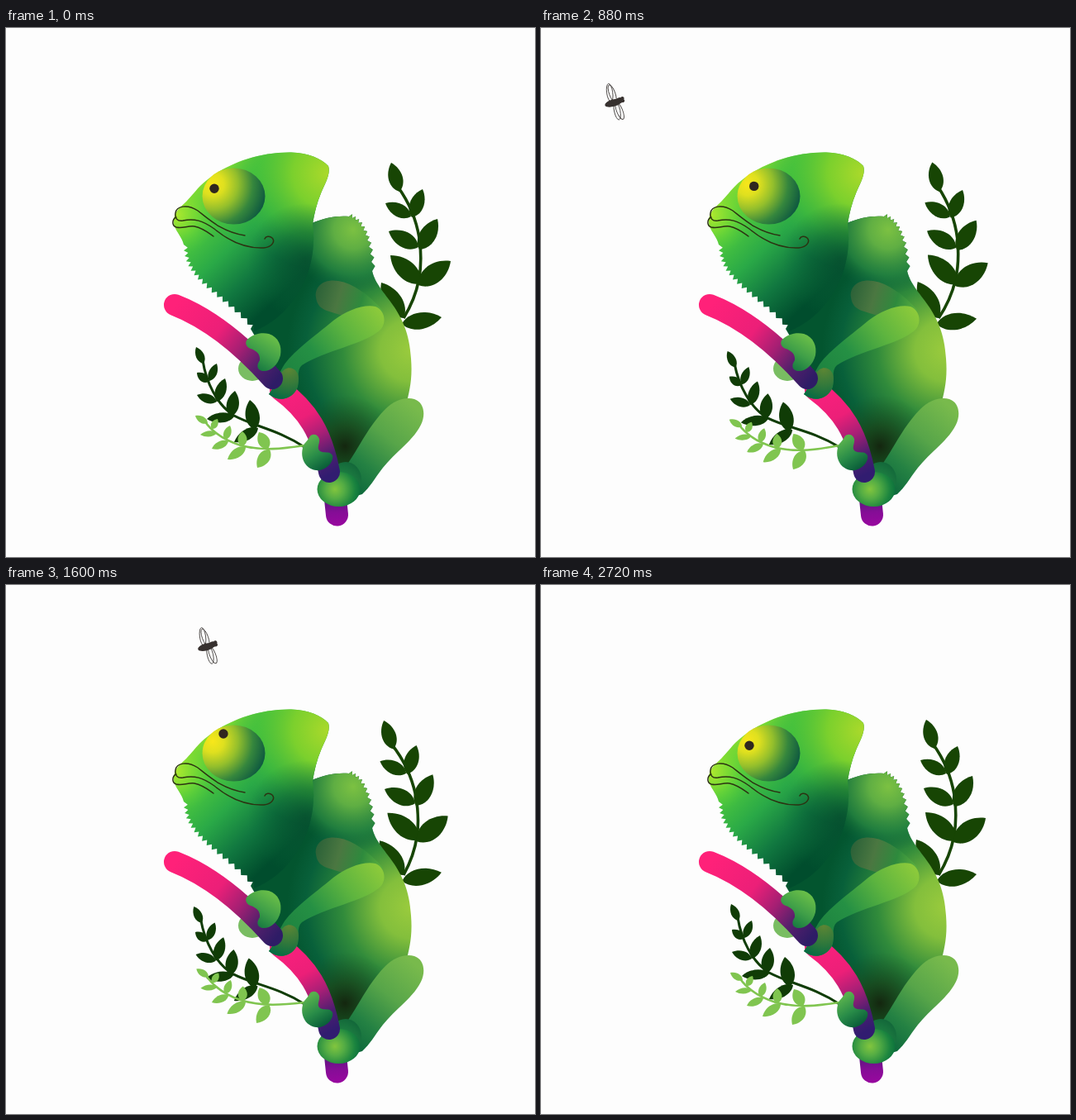
An HTML page that plays this animation: 640 px wide and 640 px high, repeating every 2800 ms.

```html
<!DOCTYPE html>
<html lang="en">
<head>
<meta charset="utf-8">
<title>Chameleon and fly</title>
<style>
html, body { margin: 0; width: 100%; height: 100%; overflow: hidden; background: #fdfdfd; }
svg { display: block; width: 100vw; height: 100vh; }
</style>
</head>
<body>
<svg viewBox="0 0 640 640">
  <defs id="defs"></defs>

  <g id="right" fill="#174504" stroke="#174504"></g>
  <g id="dark" fill="#103c06" stroke="#103c06"></g>
  <g id="light" fill="#80c550" stroke="#80c550"></g>

  <!-- torso -->
  <g id="torso"></g>

  <!-- upper arm -->
  <path fill="url(#upper)" d="M375 326C373 312 385 303 402 306C420 309 438 322 456 342L436 362C420 350 400 346 388 342C380 339 376 334 375 326Z"/>

  <!-- leg -->
  <path fill="url(#leg)" d="M410 532C426 510 438 482 459 461C470 450 484 446 494 449C506 453 508 468 502 480C492 500 472 512 456 532C446 545 440 556 431 564L404 572Z"/>
  <ellipse cx="411" cy="546" rx="19" ry="21" fill="url(#ankle)"/>

  <!-- head -->
  <g id="head"></g>
  <ellipse cx="275.500" cy="203.500" rx="38" ry="34" fill="url(#eye)"/>
  <circle id="pupil" r="5.700" fill="#30271f"/>
  <g fill="none" stroke="#2c3312" stroke-width="1.500" stroke-linecap="round">
    <path d="M289 251C262 247 246 232 232 221C220 213 206 215 205 224C204 231 208 234 214 233C228 230 238 233 252 243C270 258 290 267 312 266C322 265 326 258 322 254C319 251 314 252 313 255"/>
    <path d="M206 229C201 231 200 239 206 241C213 243 220 239 228 240C238 242 244 247 251 252"/>
  </g>

  <!-- branch with hands and feet -->
  <ellipse cx="298" cy="412" rx="17" ry="15" fill="#79bd62"/>
  <g fill="none" stroke-width="26" stroke-linecap="round">
    <path stroke="url(#tip)" stroke-width="27" d="M398 565L400.500 589"/>
  </g>
  <ellipse cx="402.500" cy="558" rx="26" ry="21" fill="url(#foot)"/>
  <path fill="none" stroke="url(#low)" stroke-width="26" stroke-linecap="round" d="M332 438C365 462 382 490 391 537"/>
  <path fill="url(#fore)" d="M318 443C324 436 329 420 335 410C346 392 372 374 396 354C412 342 432 334 447 337C459 342 461 358 452 366C432 383 386 390 358 408C351 414 355 426 353 434C349 448 330 454 318 443Z"/>
  <path fill="url(#palm)" d="M318 443C324 436 328 420 337 413C345 408 354 414 354 424C354 446 334 456 318 443Z"/>
  <path fill="none" stroke="url(#top)" stroke-width="26" stroke-linecap="round" d="M204 335C248 352 286 384 322 424"/>
  <path fill="url(#finger)" d="M291 378C298 370 309 368 318 370C330 374 334 385 332 396C329 408 320 416 310 415C302 413 304 406 307 402C308 394 302 390 296 388C291 386 289 382 291 378Z"/>
  <path fill="url(#toe)" d="M359 508C360 502 365 500 367 495C370 490 377 491 379 497C380 503 375 508 380 512C385 515 391 511 395 517C397 524 389 533 380 535C366 537 355 524 359 508Z"/>

  <!-- fly -->
  <g id="fly">
    <g fill="none" stroke="#4a4644" stroke-width=".9">
      <ellipse cx="-6" cy="-11" rx="3.600" ry="11" transform="rotate(-8 -6 -11)"/>
      <ellipse cx="-3" cy="-10" rx="3.600" ry="11" transform="rotate(-20 -3 -10)"/>
      <ellipse cx="3" cy="11" rx="3.600" ry="11" transform="rotate(-12 3 11)"/>
      <ellipse cx="6" cy="11" rx="3.600" ry="11" transform="rotate(-22 6 11)"/>
    </g>
    <g fill="#37312f" transform="rotate(-15)">
      <ellipse cx="-2" cy="1" rx="10.500" ry="4.300"/>
      <ellipse cx="6" cy="0" rx="4" ry="3.500"/>
      <circle cx="10" cy="-1.500" r="2.200"/>
      <circle cx="10" cy="1.500" r="2"/>
    </g>
  </g>
</svg>

<script>
const $ = id => document.getElementById(id);

// ---- gradients: stops are "offset colour opacity" separated by commas
const stopsOf = list => list.split(',').map(s => {
  const [o, c, a = 1] = s.trim().split(' ');
  return `<stop offset="${o}" stop-color="${c}" stop-opacity="${a}"/>`;
}).join('');
const linear = (id, x1, y1, x2, y2, list) =>
  `<linearGradient id="${id}" gradientUnits="userSpaceOnUse" x1="${x1}" y1="${y1}" x2="${x2}" y2="${y2}">${stopsOf(list)}</linearGradient>`;
const radial = (id, cx, cy, r, list) =>
  `<radialGradient id="${id}" gradientUnits="userSpaceOnUse" cx="${cx}" cy="${cy}" r="${r}">${stopsOf(list)}</radialGradient>`;

$('defs').innerHTML = [
  radial('belly', 490, 390, 150, '0 #9acb3d, .25 #83bf3c, .55 #318b3b, .85 #08603a, 1 #03552f'),
  radial('hump', 420, 244, 78, '0 #7cc142, .3 #5fae43, .7 #268540 .8, 1 #0b6337 0'),
  radial('groin', 410, 506, 62, '0 #14260f, .4 #1c4518 .75, 1 #1c5a20 0'),
  linear('skin', 222, 196, 338, 318, '0 #8fe02f, .22 #4fca3d, .5 #2aa947, .75 #117840, 1 #004d2d'),
  radial('crest', 388, 176, 118, '0 #a9d92b, .35 #7bd02d, .7 #45bf3b .7, 1 #2aa947 0'),
  radial('snout', 206, 226, 50, '0 #aee92e, .5 #7cdc33 .6, 1 #4fca3d 0'),
  radial('nape', 362, 282, 70, '0 #064f2f .85, .5 #075a33 .5, 1 #0a6b38 0'),
  radial('eye', 250, 189, 68, '0 #f8e71a, .2 #dfe01f, .45 #94bf2c, .72 #35863d, 1 #0a5440'),
  linear('upper', 376, 318, 452, 340, '0 #2c6238, .35 #4b7741, .7 #2e8a3d, 1 #57ab3e'),
  linear('fore', 452, 342, 326, 436, '0 #8cca3b, .3 #5db43f, .6 #259044, .85 #1e8440, 1 #2d7c39'),
  radial('palm', 342, 412, 38, '0 #5f8634, .5 #38793a .9, 1 #066b43'),
  linear('leg', 494, 458, 414, 552, '0 #78ba4c, .4 #57a549, .75 #248143, 1 #0f6a3c'),
  radial('ankle', 404, 556, 32, '0 #2c8e42, .6 #1c7a40, 1 #13683a'),
  radial('foot', 398, 558, 32, '0 #82c53e, .35 #55ad44, .75 #1c853f, 1 #0b6f3c'),
  linear('finger', 326, 376, 302, 414, '0 #68bd48, .5 #3f9f48, 1 #137540'),
  linear('toe', 364, 500, 386, 534, '0 #57b04d, .5 #288b48, 1 #075a38'),
  linear('top', 205, 335, 326, 428, '0 #ff2179, .4 #ec1f78, .62 #a51f73, .8 #58206c, 1 #2e1c66'),
  linear('low', 340, 444, 393, 540, '0 #f7207c, .3 #ec1f78, .55 #a81f76, .8 #4d1e70, 1 #311c70'),
  linear('tip', 398, 570, 400, 602, '0 #5a167e, .5 #850d96, 1 #98089f')
].join('');

// ---- saw-toothed edge along a cubic curve
function teeth(p, n, amp) {
  let d = '';
  for (let i = 0; i <= 2 * n; i++) {
    const t = i / (2 * n), u = 1 - t;
    const at = k => u*u*u*p[k] + 3*u*u*t*p[k+2] + 3*u*t*t*p[k+4] + t*t*t*p[k+6];
    const slope = k => u*u*(p[k+2]-p[k]) + 2*u*t*(p[k+4]-p[k+2]) + t*t*(p[k+6]-p[k+4]);
    const dx = slope(0), dy = slope(1), len = Math.hypot(dx, dy);
    const out = (i % 2 ? amp : 0) / len;
    d += `L${(at(0) + dy * out).toFixed(1)} ${(at(1) - dx * out).toFixed(1)}`;
  }
  return d;
}
const layers = (d, ids) => ids.map(id => `<path d="${d}" fill="url(#${id})"/>`).join('');

const torso = 'M366 238C385 229 400 227 415 228' +
  teeth([415, 228, 430, 234, 440, 252, 443, 294], 11, 4) +
  'C450 324 487 338 490 400C492 425 488 440 484 456L440 540L404 548C392 500 370 464 340 440L296 364Z';
const back = teeth([300, 367, 255, 318, 213, 305, 215, 262], 17, -5);
const head = 'M215 262C213 252 203 244 203 234C203 226 208 219 214 214C226 203 232 192 243 184' +
  'C262 168 300 150 345 150.500C365 151 382 158 390 167C393 177 386 188 381 200C376 212 373 224 371 237' +
  'C379 296 345 350 300 367' + back + 'Z';
$('torso').innerHTML = layers(torso, ['belly', 'hump', 'groin']);
$('head').innerHTML = layers(head, ['skin', 'crest', 'snout', 'nape']);

// ---- plants
function leaf([x1, y1, x2, y2, w]) {
  const dx = x2 - x1, dy = y2 - y1, len = Math.hypot(dx, dy);
  const nx = -dy / len * w * .67, ny = dx / len * w * .67;
  const c = (f, s) => `${(x1 + dx * f + nx * s).toFixed(1)} ${(y1 + dy * f + ny * s).toFixed(1)}`;
  return `<path stroke="none" d="M${x1} ${y1}C${c(.2, 1)} ${c(.68, 1)} ${x2} ${y2}C${c(.68, -1)} ${c(.2, -1)} ${x1} ${y1}Z"/>`;
}
const plant = (id, stem, width, leaves) => {
  $(id).innerHTML = `<path fill="none" stroke-width="${width}" d="${stem}"/>` + leaves.map(leaf).join('');
};
plant('right', 'M481 351C500 320 505 290 500 254C496 230 487 210 474 192', 3.6, [
  [476, 198, 466, 163, 17],
  [490, 228, 459, 212, 16], [491, 229, 504, 195, 17],
  [499, 265, 463, 246, 19], [500, 268, 522, 231, 20],
  [502, 309, 465, 275, 22], [499, 311, 538, 282, 23],
  [481, 351, 454, 308, 22], [479, 358, 527, 350, 20]
]);
plant('dark', 'M361 507C330 486 300 482 276 469C255 456 242 428 238 402', 3, [
  [239, 406, 230, 386, 10],
  [245, 428, 231, 417, 10], [246, 427, 255, 406, 10],
  [255, 452, 231, 444, 11], [255, 452, 265, 424, 13],
  [276, 470, 243, 473, 12], [272, 470, 277, 439, 15],
  [305, 484, 276, 501, 13], [301, 486, 295, 450, 17]
]);
plant('light', 'M361 505C335 509 310 512 284 505C262 498 248 487 240 475', 2.6, [
  [244, 478, 229, 469, 8],
  [249, 485, 256, 473, 8], [255, 490, 235, 492, 7],
  [265, 498, 271, 481, 9], [269, 500, 249, 509, 9],
  [286, 506, 286, 488, 11], [290, 507, 268, 522, 11],
  [317, 509, 306, 489, 14], [319, 510, 304, 532, 14]
]);

// ---- motion: smooth monotone curve through [time, value] pairs
function track(...keys) {
  const slope = i => (keys[i + 1][1] - keys[i][1]) / (keys[i + 1][0] - keys[i][0]);
  const m = keys.map((_, i) => {
    if (!i || i === keys.length - 1) return 0;
    const a = slope(i - 1), b = slope(i);
    return a * b > 0 ? 2 * a * b / (a + b) : 0;
  });
  return t => {
    if (t <= keys[0][0]) return keys[0][1];
    for (let i = 0; i < keys.length - 1; i++) {
      const [t0, a] = keys[i], [t1, b] = keys[i + 1];
      if (t > t1) continue;
      const h = t1 - t0, s = (t - t0) / h, s2 = s * s, s3 = s2 * s;
      return a * (2*s3 - 3*s2 + 1) + b * (3*s2 - 2*s3) + h * (m[i] * (s3 - 2*s2 + s) + m[i+1] * (s3 - s2));
    }
    return keys[keys.length - 1][1];
  };
}
const flyX = track([400, -70], [560, 11], [640, 45], [1120, 128], [1600, 244], [1920, 295], [2240, 338], [2320, 350]);
const flyY = track([400, 165], [560, 128], [640, 109], [1120, 79], [1600, 73.5], [1920, 53], [2240, 2], [2320, -40]);
const pupilX = track([400, 252], [640, 254.5], [1120, 260.5], [1600, 263], [2320, 263], [2720, 252]);
const pupilY = track([400, 194.3], [640, 193.5], [1120, 188.3], [1600, 180], [2320, 180], [2720, 194.3]);
const sways = [
  ['right', 481, 352, track([0, 0], [640, 1.6], [880, 2.2], [1120, 1.6], [1600, -2.7], [1920, -4], [2320, -2.1], [2720, 0])],
  ['dark', 361, 507, track([0, 0], [640, -1.9], [1120, -2.2], [1600, -1.3], [1920, -2.3], [2320, -2.6], [2720, 0])],
  ['light', 360, 505, track([0, 0], [640, -2], [1120, -2.1], [1600, 2], [1920, 2.2], [2320, 0], [2720, 0])]
];

const LOOP = 2800, STEP = 80;
function draw(ms) {
  const t = Math.floor(ms % LOOP / STEP) * STEP;
  $('fly').setAttribute('transform', `translate(${flyX(t)} ${flyY(t)})`);
  $('pupil').setAttribute('cx', pupilX(t));
  $('pupil').setAttribute('cy', pupilY(t));
  for (const [id, x, y, angle] of sways) $(id).setAttribute('transform', `rotate(${angle(t)} ${x} ${y})`);
}

const start = performance.now();
function tick() {
  draw(performance.now() - start);
  requestAnimationFrame(tick);
}
draw(0);
requestAnimationFrame(tick);
</script>
</body>
</html>
```
